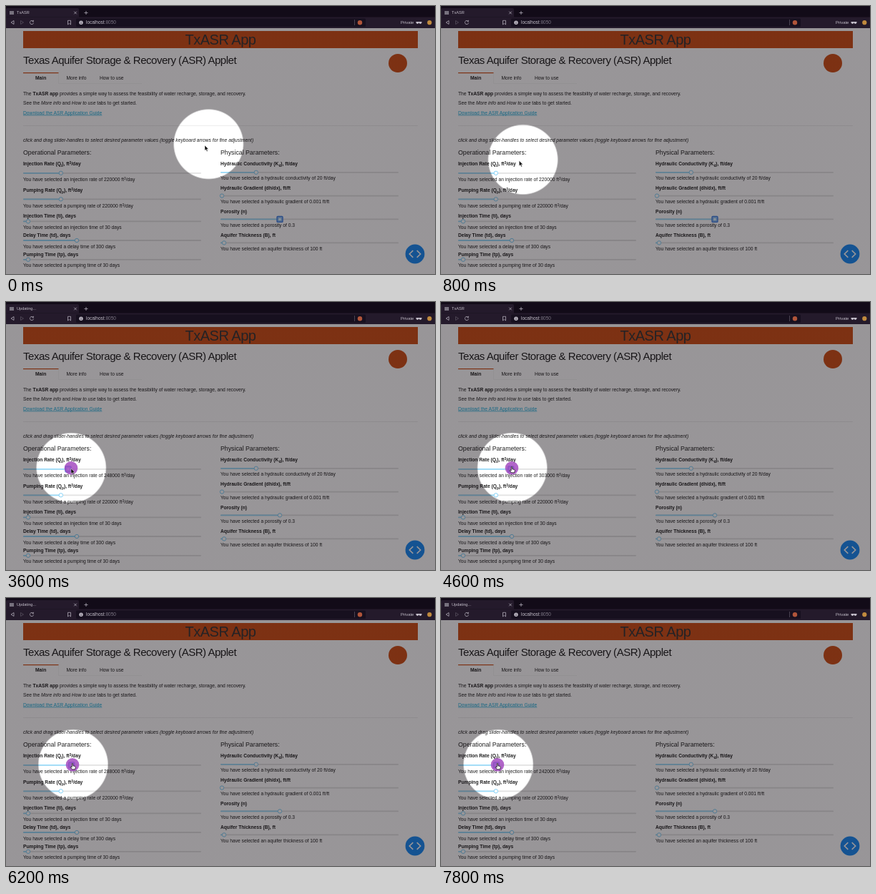
Recreate the animation shown at these times as an HTML page. Size 600x375 px, loop 8000 ms.

```html
<!DOCTYPE html>
<html lang="en">
<head>
<meta charset="utf-8">
<title>TxASR</title>
<style>
  html, body { margin: 0; width: 100%; height: 100%; overflow: hidden; background: #989698; }
  svg { display: block; width: 100%; height: 100%; }
  text { font: 6.71px "Liberation Sans", Arial, sans-serif; fill: #222; white-space: pre; }
  .label { font-weight: bold; font-size: 6.67px; }
  .bold { font-weight: bold; }
  .italic { font-style: italic; }
  .section { font-size: 8.75px; }
  .heading { font-size: 15px; letter-spacing: -.47px; }
  .banner { font-size: 20px; letter-spacing: -.5px; text-anchor: middle; fill: #383838; }
  .link { fill: #1eaedb; text-decoration: underline; }
  .small { font-size: 4.8px; }
  .chrome text { fill: #c4bfca; font-size: 5.6px; }
  .icon { fill: none; stroke: #b0abb8; stroke-width: .8; }
  .faint { stroke: #57505f; }
</style>
</head>
<body>
<svg viewBox="0 0 600 375">
  <defs>
    <radialGradient id="light" gradientUnits="userSpaceOnUse" cx="0" cy="0" r="49.5">
      <stop offset=".965" stop-color="#0a040a" stop-opacity="0"/>
      <stop offset="1" stop-color="#0a040a" stop-opacity=".42"/>
    </radialGradient>
  </defs>

  <rect width="600" height="375" fill="#fff"/>
  <rect x="24" y="35" width="552" height="24" fill="#d0521a"/>
  <text class="banner" x="300" y="54">TxASR App</text>
  <text class="heading" x="24" y="81.3">Texas Aquifer Storage &amp; Recovery (ASR) Applet</text>
  <circle cx="548" cy="80" r="13" fill="#d0521a"/>

  <rect x="24" y="93" width="49.5" height="1.2" fill="#d0521a"/>
  <path d="M73.5 94V108.5H190" fill="none" stroke="#ececec" stroke-width=".5"/>
  <text class="bold" x="41" y="103">Main</text>
  <text x="84.5" y="103">More info</text>
  <text x="131" y="103">How to use</text>

  <text x="24" y="124.8">The <tspan class="bold">TxASR app</tspan> provides a simple way to assess the feasibility of water recharge, storage, and recovery.</text>
  <text x="24" y="138.2">See the <tspan class="italic">More info</tspan> and <tspan class="italic">How to use</tspan> tabs to get started.</text>
  <text class="link" x="24" y="151.6">Download the ASR Application Guide</text>
  <path d="M24 167.5H576" stroke="#e1e1e1" stroke-width=".6"/>
  <text class="italic" x="24" y="189.6">click and drag slider-handles to select desired parameter values (toggle keyboard arrows for fine adjustment)</text>
  <text class="section" x="24" y="208.3">Operational Parameters:</text>
  <text class="section" x="300" y="208.3">Physical Parameters:</text>

  <g id="sliders"></g>
  <g id="focus">
    <rect x="-4" y="-4" width="8" height="8" rx="1" fill="#8fb9f2" stroke="#3f7fe0" stroke-width="1.3"/>
    <circle r="2.2" fill="#e8f4ff" stroke="#7cc4f5" stroke-width=".8"/>
  </g>

  <circle cx="572" cy="347" r="13.4" fill="#1c8cf4"/>
  <path d="M569.3 342.2L564.3 347L569.3 351.8M574.7 342.2L579.7 347L574.7 351.8" fill="none" stroke="#fff" stroke-width="1.6"/>

  <rect id="dim" x="-700" y="-500" width="1400" height="1000" fill="url(#light)"/>

  <g class="chrome">
    <rect width="600" height="31" fill="#241a2b"/>
    <rect width="600" height="15.5" fill="#120b18"/>
    <path d="M0 15.5V5Q0 3 2 3H100Q102 3 102 5V15.5Z" fill="#241a2b"/>
    <rect x="98" y="17.5" width="405" height="11.5" rx="1.5" fill="#17101f"/>
    <rect x="5" y="7" width="6" height="5" fill="#77727e"/>
    <text id="tab" x="15" y="11.2"></text>
    <path class="icon" d="M95.2 7.7L98.8 11.3M98.8 7.7L95.2 11.3M109.5 9.5H114.5M112 7V12"/>
    <path class="icon" d="M11 20.5L7 23L11 25.5ZM38 21.3A2.6 2.6 0 1 0 38.6 23.5M38.4 19.8V21.8H36.4M86.5 20.3H90.5V26L88.5 24.3L86.5 26Z"/>
    <path class="icon faint" d="M20.5 20.5L24.5 23L20.5 25.5ZM487.5 19V27"/>
    <circle cx="105" cy="23.2" r="2.7" fill="#c0bbc6"/>
    <path d="M105 22.8V25M105 21.2V21.9" stroke="#17101f" stroke-width=".8"/>
    <text x="112" y="25.4" style="font-size:6.5px">localhost<tspan fill="#7d7785">:8050</tspan></text>
    <circle cx="495" cy="23.2" r="3.2" fill="#b0553a"/>
    <text x="552" y="25.2" style="font-size:5.9px">Private</text>
    <path d="M573.5 22H581.5V23.2Q581 25 579.4 25Q578 25 577.5 23.3Q577 25 575.6 25Q574 25 573.5 23.2Z" fill="#c4bfca"/>
    <circle cx="592.3" cy="23.2" r="3.1" fill="#c08a3e"/>
  </g>

  <circle id="press" r="9.3" fill="#a044bd" opacity=".82"/>
  <path id="arrow" d="M0 0V7.2L1.7 5.7L2.9 8.4L4.1 7.9L2.9 5.2H5.2Z" fill="#111" stroke="#fff" stroke-width=".4"/>
  <path id="hand" d="M-.8 -1Q0 -2 .7 -1V2L3.6 2.7Q4.6 3 4.3 4.3L3.6 7H-.6L-2.8 4Q-2.6 3 -1.6 3.5L-.8 4.2Z" fill="#fff" stroke="#111" stroke-width=".75"/>
</svg>

<script>
const LOOP = 8000, STEP = 200, PRESS_AT = 2600, LIGHT_LAG = 22;
const RAIL_X = 24, RAIL_WIDTH = 249;
const $ = id => document.getElementById(id);

// Raised or lowered small text, then the rest back on the baseline.
const script = (small, dy, rest) =>
  `<tspan class="small" dy="${dy}">${small}</tspan><tspan dy="${-dy}">${rest}</tspan>`;
const cubic = 'ft' + script('3', -2.4, '/day');
const rateLabel = (name, index) => name + script(index, 1.5, '), ft') + script('3', -2.4, '/day');

// x, label, label y, rail y, handle x, result, result y
const sliders = [
  [24, rateLabel('Injection Rate (Q', 'i'), 223.3, 233.8, 76.8, `an injection rate of <tspan id="rate">220000</tspan> ${cubic}`, 245.3],
  [24, rateLabel('Pumping Rate (Q', 'p'), 260, 270.3, 76.8, `a pumping rate of 220000 ${cubic}`, 282.2],
  [24, 'Injection Time (ti), days', 296.3, 301.4, 31, 'an injection time of 30 days', 312.3],
  [24, 'Delay Time (td), days', 323.2, 328, 99, 'a delay time of 300 days', 339],
  [24, 'Pumping Time (tp), days', 349.8, 354.8, 31, 'a pumping time of 30 days', 365.4],
  [300, 'Hydraulic Conductivity (K' + script('d', 1.5, '), ft/day'), 223.2, 232.8, 349.8, 'a hydraulic conductivity of 20 ft/day', 242.8],
  [300, 'Hydraulic Gradient (dh/dx), ft/ft', 257.4, 265.6, 302, 'a hydraulic gradient of 0.001 ft/ft', 276],
  [300, 'Porosity (n)', 290.2, 298.4, 383, 'a porosity of 0.3', 309],
  [300, 'Aquifer Thickness (B), ft', 323.2, 331.4, 305, 'an aquifer thickness of 100 ft', 342],
];

$('sliders').innerHTML = sliders.map(([x, label, labelY, railY, handleX, result, resultY]) => `
  <text class="label" x="${x}" y="${labelY}">${label}</text>
  <rect x="${x}" y="${railY - .9}" width="${RAIL_WIDTH}" height="1.8" rx=".9" fill="#e2e2e2"/>
  <rect class="track" x="${x}" y="${railY - .9}" width="${handleX - x}" height="1.8" rx=".9" fill="#9bdcfa"/>
  <circle class="handle" cx="${handleX}" cy="${railY}" r="2.7" fill="#fff" stroke="#7fd0f7" stroke-width=".95"/>
  <text x="${x}" y="${resultY}">You have selected ${result}</text>`).join('');

const track = document.querySelector('.track');
const handle = document.querySelector('.handle');

// time, pointer x, pointer y, handle x
const poses = [
  [-200, 320, 189.5, 76.8],
  [0, 278, 195, 76.8],
  [800, 109.3, 216.6, 76.8],
  [1000, 87, 229, 76.8],
  [1200, 80, 233.5, 76.8],
  [1600, 78.5, 234.3, 76.8],
  [3200, 79, 234, 76.8],
  [3400, 87, 233.5, 83.86],
  [3600, 91, 233, 87],
  [4200, 99, 233, 97.69],
  [5400, 99, 233, 97.69],
  [6000, 95.3, 234, 93.92],
  [6200, 93, 234, 91.7],
  [6600, 91.3, 234, 90],
  [7200, 91.3, 234, 90],
  [7600, 83.6, 234, 82.35],
  [7800, 79, 234, 77.5],
  [8000, 77, 234, 75.5],
];

function poseAt(t) {
  const next = Math.max(1, poses.findIndex(p => p[0] >= t));
  const a = poses[next - 1], b = poses[next];
  const k = (t - a[0]) / (b[0] - a[0]);
  const [, x, y, handleX] = a.map((v, i) => v + (b[i] - v) * k);
  return { x, y, handleX };
}

// The slider runs from 10 to 1000 thousand.
const rateAt = handleX => Math.round(10 + (handleX - RAIL_X) / RAIL_WIDTH * 990) * 1000;

const place = (id, x, y) => $(id).setAttribute('transform', `translate(${x} ${y})`);
const show = (id, on) => $(id).setAttribute('visibility', on ? 'visible' : 'hidden');

function draw(now) {
  const t = Math.floor(now % LOOP / STEP) * STEP;
  const { x, y, handleX } = poseAt(t);
  const before = poseAt(t - STEP);
  const light = poseAt(t - LIGHT_LAG);
  const pressed = t >= PRESS_AT;
  const overHandle = Math.abs(x - handleX) < 3.5;

  place('dim', light.x + .7, light.y - 1.1);
  place('press', x, y - .7);
  place('arrow', x, y);
  place('hand', x, y - 1.2);
  place('focus', pressed ? handleX : 383, pressed ? 233.8 : 298.4);
  show('press', pressed);
  show('hand', overHandle);
  show('arrow', !overHandle);
  handle.setAttribute('cx', handleX);
  track.setAttribute('width', handleX - RAIL_X);
  // The readout trails the drag by one step.
  $('rate').textContent = rateAt(before.handleX);
  $('tab').textContent = handleX === before.handleX ? 'TxASR' : 'Updating...';
}

const start = performance.now();
function tick() {
  draw(performance.now() - start);
  requestAnimationFrame(tick);
}
tick();
</script>
</body>
</html>
```
